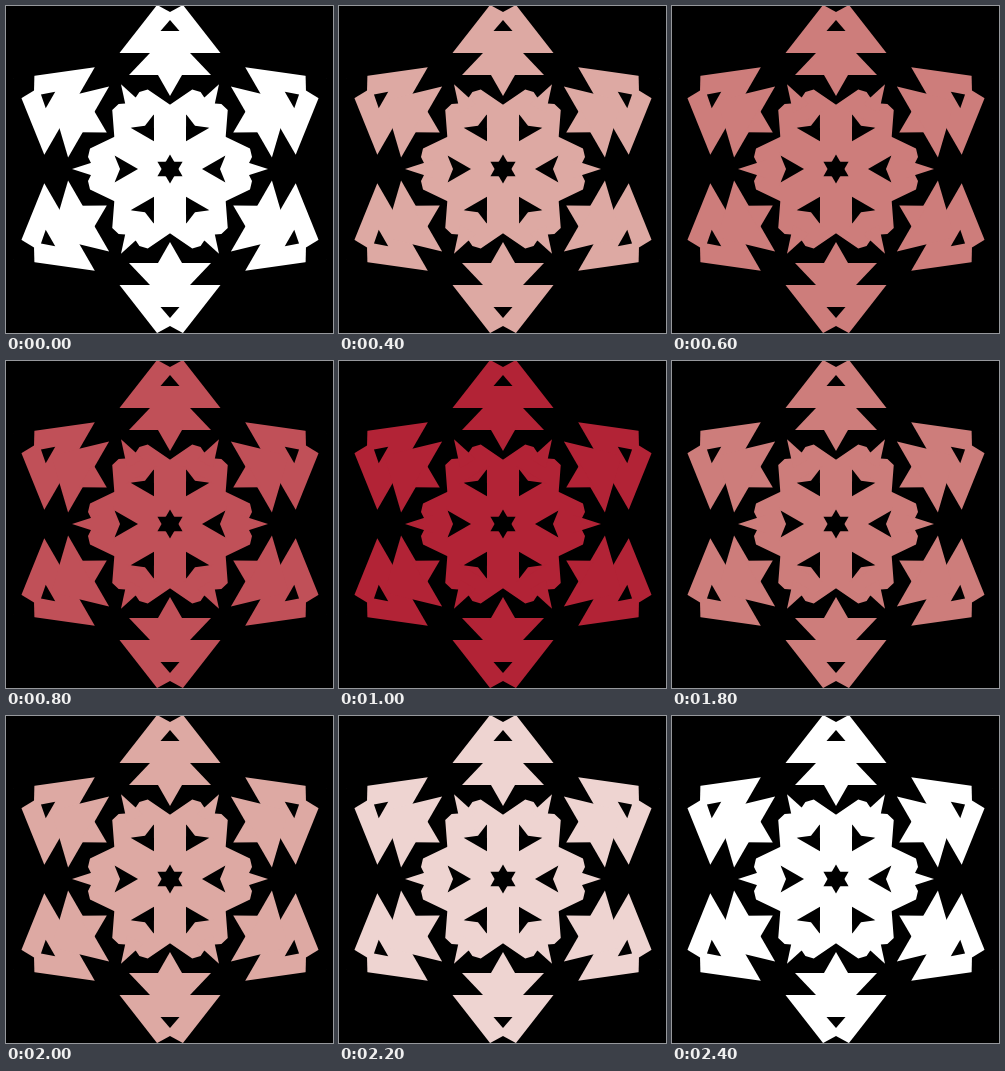
An HTML page with a canvas that plays this animation: 327 by 327 pixels, repeating every 7.4 s.

```html
<!DOCTYPE html>
<html lang="en">
<head>
<meta charset="utf-8">
<title>Snowflake</title>
<style>
  html, body { margin: 0; height: 100%; overflow: hidden; background: #000; }
  canvas { display: block; width: 100vw; height: 100vh; }
</style>
</head>
<body>
<canvas id="stage" width="327" height="327"></canvas>
<script>
const LOOP = 7400, STEP = 100, LEVELS = 10, FADE_BACK = 1500;
const WHITE = [255, 255, 255], ROSE = [212, 147, 140], CRIMSON = [178, 35, 54];
const SIXTH = Math.PI / 3;
const ctx = document.getElementById("stage").getContext("2d");

// Half of one petal's edge, pointing along +x; the other half is its mirror.
const petalHalf = [[79, 6], [82, 12], [80, 20.5], [56, 32]];
const petal = [...petalHalf.map(([x, y]) => [x, -y]).reverse(), ...petalHalf];

function fill(points, colour) {
  ctx.fillStyle = colour;
  ctx.beginPath();
  points.forEach(([x, y]) => ctx.lineTo(x, y));
  ctx.fill();
}

// Isosceles triangle on the x axis.
function triangle(apex, base, halfWidth, colour) {
  fill([[apex, 0], [base, halfWidth], [base, -halfWidth]], colour);
}

function sixTimes(drawPart) {
  for (let k = 0; k < 6; k++) {
    drawPart();
    ctx.rotate(SIXTH);
  }
}

function drawTree(colour) {
  triangle(180.6, 116, 50.5, colour);
  triangle(137, 94, 41, colour);
  triangle(73, 97, 13.7, colour);
  triangle(157, 181, 44, "#000");
  triangle(149, 138, 9.5, "#000");
}

function drawPetalDetail(colour) {
  triangle(98, 70, 9, colour);
  triangle(32, 55.5, 13.5, "#000");
  triangle(50, 57, 17.2, colour);
}

function drawBody(colour) {
  const ring = [];
  for (let k = 0; k < 6; k++) {
    const c = Math.cos(k * SIXTH), s = Math.sin(k * SIXTH);
    ring.push(...petal.map(([x, y]) => [x * c - y * s, x * s + y * c]));
  }
  fill(ring, colour);
}

function drawFlake(colour) {
  ctx.resetTransform();
  ctx.fillStyle = "#000";
  ctx.fillRect(0, 0, 327, 327);
  ctx.translate(164, 163);
  drawBody(colour);
  sixTimes(() => drawPetalDetail(colour));
  ctx.rotate(SIXTH / 2);
  sixTimes(() => drawTree(colour));
  sixTimes(() => triangle(14.5, 0, 8.4, "#000"));
}

function mix(from, to, amount) {
  return `rgb(${from.map((v, i) => Math.round(v + (to[i] - v) * amount)).join()})`;
}

function colourAt(time) {
  const step = Math.floor(time / STEP);
  const back = FADE_BACK / STEP + LEVELS - 1 - step;
  const fade = 2 * Math.max(0, Math.min(LEVELS, step, back)) / LEVELS;
  return fade < 1 ? mix(WHITE, ROSE, fade) : mix(ROSE, CRIMSON, fade - 1);
}

const start = performance.now();
function frame() {
  drawFlake(colourAt((performance.now() - start) % LOOP));
  requestAnimationFrame(frame);
}
frame();
</script>
</body>
</html>
```
